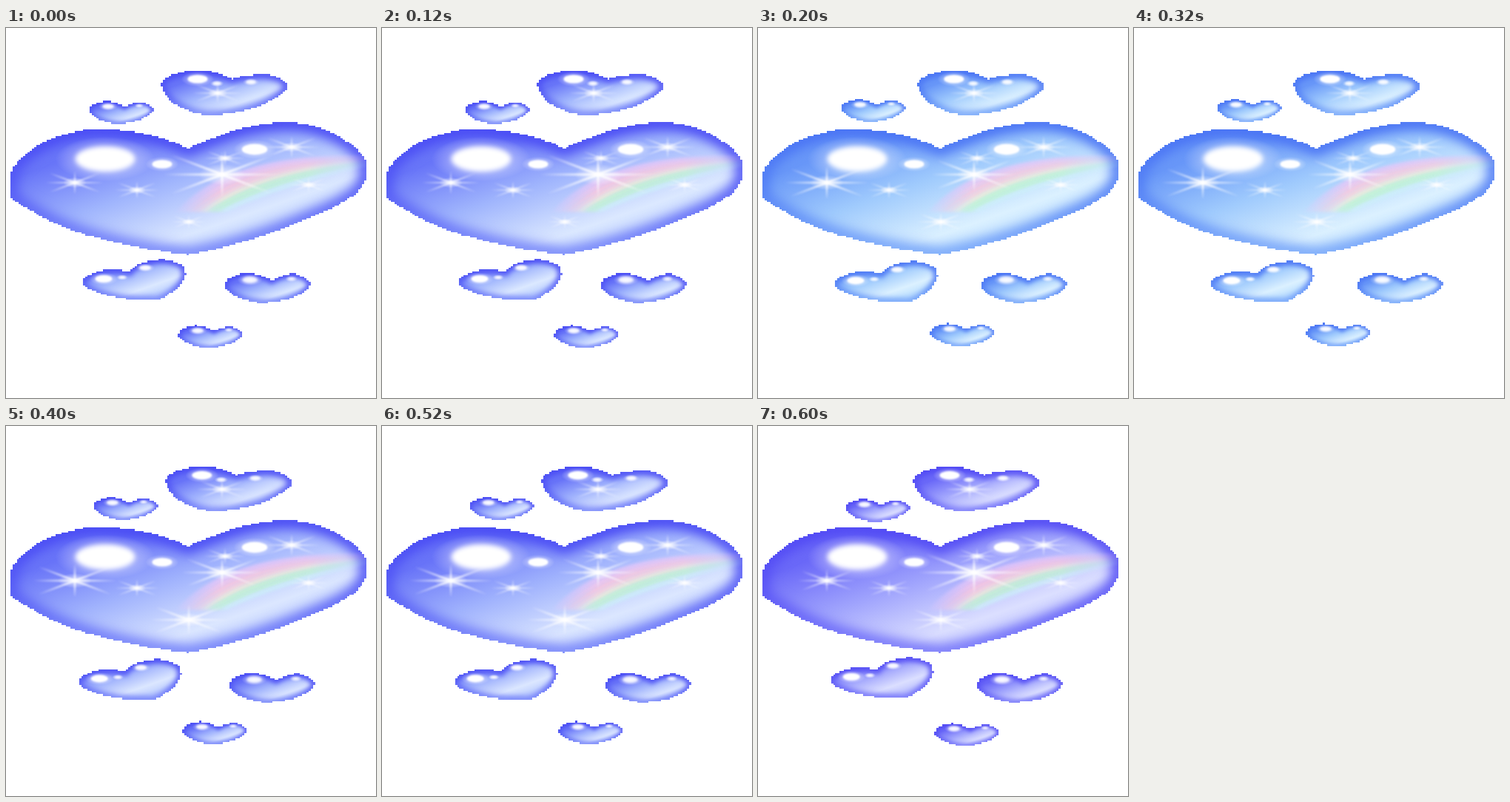
An HTML page with a canvas for the animation above (800 ms loop, 500 by 500 pixels).

```html
<!DOCTYPE html>
<html lang="en">
<head>
<meta charset="utf-8">
<title>Bubble hearts</title>
<style>
html, body { margin: 0; width: 100%; height: 100%; overflow: hidden; background: #fff; }
canvas { display: block; width: 500px; height: 500px; }
</style>
</head>
<body>
<canvas id="stage" width="500" height="500"></canvas>
<script>
const start = performance.now();
const SIZE = 500, STEP = 200, STEPS = 4;
const CELL_W = 2.9, CELL_H = 2.4;

// Hue of the rim, and how far it falls towards the light side
const hues = [[240, 22], [226, 22], [240, 19], [243, 9]];

const tiny = {
  path: 'M160 107 C153 102 144 99 135 99 C122 100 112 106 112 112 C114 119 134 129 155 129 C178 128 199 118 199 110 C196 104 188 100 180 100 C172 101 165 104 160 107Z',
  top: 99, bottom: 129, rim: 4,
  spots: [[138, 106, 8], [180, 105, 4]]
};

// way: direction of the sway in x and y; lag: step at which x moves out
const hearts = [
  {
    path: 'M246 163 C215 148 172 137 125 137 C62 138 5 176 5 205 L6 229 C55 263 110 289 245 306 C300 298 365 276 420 252 C455 238 487 220 487 200 L487 180 C470 152 425 128 380 128 C325 128 290 145 246 163Z',
    top: 128, bottom: 306, rim: 13, way: [0, 0], lag: 0,
    spots: [[134, 177, 42], [336, 164, 18], [211, 184, 14]],
    // x, y, mean reach, pulse, step of the peak
    stars: [
      [292, 198, 67, 15, 3.6], [93, 209, 48, 12, 1.5], [247, 262, 38, 15, 2.2],
      [386, 161, 38, 0, 0], [296, 176, 28, 0, 0], [177, 219, 30, 0, 0], [409, 212, 27, 0, 0]
    ]
  },
  {
    path: 'M306 69 C290 62 278 57 262 57 C232 57 210 68 210 76 C210 92 235 113 270 117 C310 118 355 107 379 83 L379 74 C372 67 358 63 345 63 C330 63 318 66 306 69Z',
    top: 57, bottom: 117, rim: 7, way: [1, -1], lag: 1,
    spots: [[259, 69, 14], [331, 73, 7], [285, 75, 6]],
    stars: [[286, 88, 34, 0, 0]]
  },
  {
    path: 'M167 330 C160 328 150 327 140 327 C118 328 103 338 103 344 C108 354 140 366 180 367 L204 367 C222 362 242 345 242 333 L241 324 C235 316 220 313 207 313 C185 315 172 322 167 330Z',
    top: 313, bottom: 367, rim: 6, way: [-1, 1], lag: 2,
    spots: [[132, 339, 12], [188, 324, 8], [157, 337, 5]]
  },
  { ...tiny, way: [1, -1], lag: 2 },
  { ...tiny, way: [1, 1], lag: 1, at: [295, 331, 4 / 3] },
  { ...tiny, way: [1, -1], lag: 2, at: [233, 402, 1] }
];

function tint(step, light) {
  const [hue, fall] = hues[step];
  return `hsl(${hue - fall * light}, ${88 + 12 * light}%, ${61 + 32 * light}%)`;
}

function layer(w = SIZE, h = SIZE) {
  const c = document.createElement('canvas');
  c.width = w;
  c.height = h;
  return c.getContext('2d');
}

// Each heart is out for two steps of four
const out = (step, lag) => (step - lag + STEPS) % STEPS < 2 ? 1 : 0;

// x and y swap in turn, so that the heart circles
function sway(heart, step) {
  const y = out(step, 3 - heart.lag), x = out(step, heart.lag);
  return [heart.way[0] * x * 2 * CELL_W, heart.way[1] * y * CELL_H];
}

function place(g, heart, step) {
  g.translate(...sway(heart, step));
  if (heart.at) {
    const [x, y, s] = heart.at;
    g.translate(x, y);
    g.scale(s, s);
    g.translate(-112, -99);
  }
}

// Coarse stepped silhouette
function silhouette(heart, shape, step) {
  const w = Math.ceil(SIZE / CELL_W), h = Math.ceil(SIZE / CELL_H);
  const g = layer(w, h);
  g.scale(1 / CELL_W, 1 / CELL_H);
  place(g, heart, step);
  g.fill(shape);
  const img = g.getImageData(0, 0, w, h), d = img.data;
  for (let i = 3; i < d.length; i += 4) d[i] = d[i] > 100 ? 255 : 0;
  g.putImageData(img, 0, 0);
  return g.canvas;
}

function glow(g, x, y, rx, ry, power) {
  g.save();
  g.translate(x, y);
  g.scale(rx, ry);
  const light = g.createRadialGradient(0, 0, 0, 0, 0, 1);
  light.addColorStop(0, `rgba(255,255,255,${power})`);
  light.addColorStop(1, 'rgba(255,255,255,0)');
  g.fillStyle = light;
  g.fillRect(-1, -1, 2, 2);
  g.restore();
}

function star(g, step, [x, y, mean, pulse, peak]) {
  const r = mean + pulse * Math.cos((step - peak) * Math.PI / 2);
  g.save();
  g.translate(x, y);
  g.filter = 'blur(0.9px)';
  g.globalAlpha = Math.min(.85, .3 + r / 110);
  g.lineWidth = 1.8 + r / 45;
  for (const [a, b] of [[1, 0], [.87, .33], [.87, -.33], [0, .4]]) {
    const dx = a * r, dy = b * r;
    const ray = g.createRadialGradient(0, 0, 0, 0, 0, Math.hypot(dx, dy));
    ray.addColorStop(0, '#fff');
    ray.addColorStop(.45, 'rgba(255,255,255,.6)');
    ray.addColorStop(1, 'rgba(255,255,255,0)');
    g.strokeStyle = ray;
    g.beginPath();
    g.moveTo(-dx, -dy);
    g.lineTo(dx, dy);
    g.stroke();
  }
  g.restore();
  glow(g, x, y, r * .4, r * .18, .8);
}

function rainbow() {
  const g = layer();
  const top = [230, 248, 300, 169, 484, 173];
  const low = [296, 248, 372, 212, 487, 186];
  const colors = ['#e6c6f8', '#f6c6ec', '#ffc6dc', '#ffd0d8', '#f4ecd6', '#c4f6cc', '#bff4d0', '#cdeefa'];
  const curve = t => top.map((v, i) => v + (low[i] - v) * t);
  g.filter = 'blur(2px)';
  colors.forEach((color, i) => {
    const a = curve(i / colors.length), b = curve((i + 1.2) / colors.length);
    g.fillStyle = color;
    g.beginPath();
    g.moveTo(a[0], a[1]);
    g.quadraticCurveTo(...a.slice(2));
    g.lineTo(b[4], b[5]);
    g.quadraticCurveTo(b[2], b[3], b[0], b[1]);
    g.fill();
  });
  g.filter = 'none';
  g.globalCompositeOperation = 'destination-in';
  const fade = g.createLinearGradient(228, 250, 488, 176);
  fade.addColorStop(0, 'rgba(0,0,0,.1)');
  fade.addColorStop(.25, 'rgba(0,0,0,.85)');
  fade.addColorStop(.7, 'rgba(0,0,0,.85)');
  fade.addColorStop(1, 'rgba(0,0,0,.1)');
  g.fillStyle = fade;
  g.fillRect(0, 0, SIZE, SIZE);
  return g.canvas;
}

const arc = rainbow();

function paintHeart(heart, step) {
  const g = layer(), shape = new Path2D(heart.path);
  const { top, bottom, rim, spots, stars = [] } = heart;
  const big = heart === hearts[0], tall = bottom - top;
  const scale = heart.at ? heart.at[2] : 1;
  g.save();
  place(g, heart, step);
  const mid = spots[0][0] + tall * .5;
  const body = g.createLinearGradient(mid, top, mid + tall * .35, bottom);
  body.addColorStop(0, tint(step, .25));
  body.addColorStop(.4, tint(step, .62));
  body.addColorStop(.8, tint(step, 1));
  body.addColorStop(1, tint(step, .85));
  g.fillStyle = body;
  g.fillRect(-SIZE, -SIZE, 3 * SIZE, 3 * SIZE);

  g.save();
  const shade = g.createLinearGradient(0, top, 0, bottom);
  shade.addColorStop(0, tint(step, 0));
  shade.addColorStop(.5, tint(step, .1));
  shade.addColorStop(1, tint(step, .35));
  g.strokeStyle = shade;
  g.lineWidth = rim * 1.5;
  g.filter = `blur(${rim * .6 * scale}px)`;
  g.stroke(shape);
  g.restore();

  if (big) g.drawImage(arc, 0, 0);
  for (const s of stars) star(g, step, s);

  for (const [x, y, r] of spots) {
    const ry = r * .4;
    glow(g, x, y, r * 1.6, ry * 1.8, .75);
    g.filter = `blur(${Math.max(1, ry * .18) * scale}px)`;
    g.fillStyle = `rgba(255,255,255,${Math.min(1, .3 + r / 15)})`;
    g.beginPath();
    g.ellipse(x, y, r * .96, ry, 0, 0, Math.PI * 2);
    g.fill();
    g.filter = 'none';
  }
  g.restore();

  g.globalCompositeOperation = 'destination-in';
  g.imageSmoothingEnabled = false;
  const mask = silhouette(heart, shape, step);
  g.drawImage(mask, 0, 0, mask.width * CELL_W, mask.height * CELL_H);
  return g.canvas;
}

const scenes = hues.map((_, step) => {
  const g = layer();
  g.fillStyle = '#fff';
  g.fillRect(0, 0, SIZE, SIZE);
  for (const heart of hearts) g.drawImage(paintHeart(heart, step), 0, 0);
  return g.canvas;
});

const stage = document.getElementById('stage').getContext('2d');

function tick() {
  const time = performance.now() - start;
  stage.drawImage(scenes[Math.floor(time / STEP) % STEPS], 0, 0);
  requestAnimationFrame(tick);
}
tick();
</script>
</body>
</html>
```
